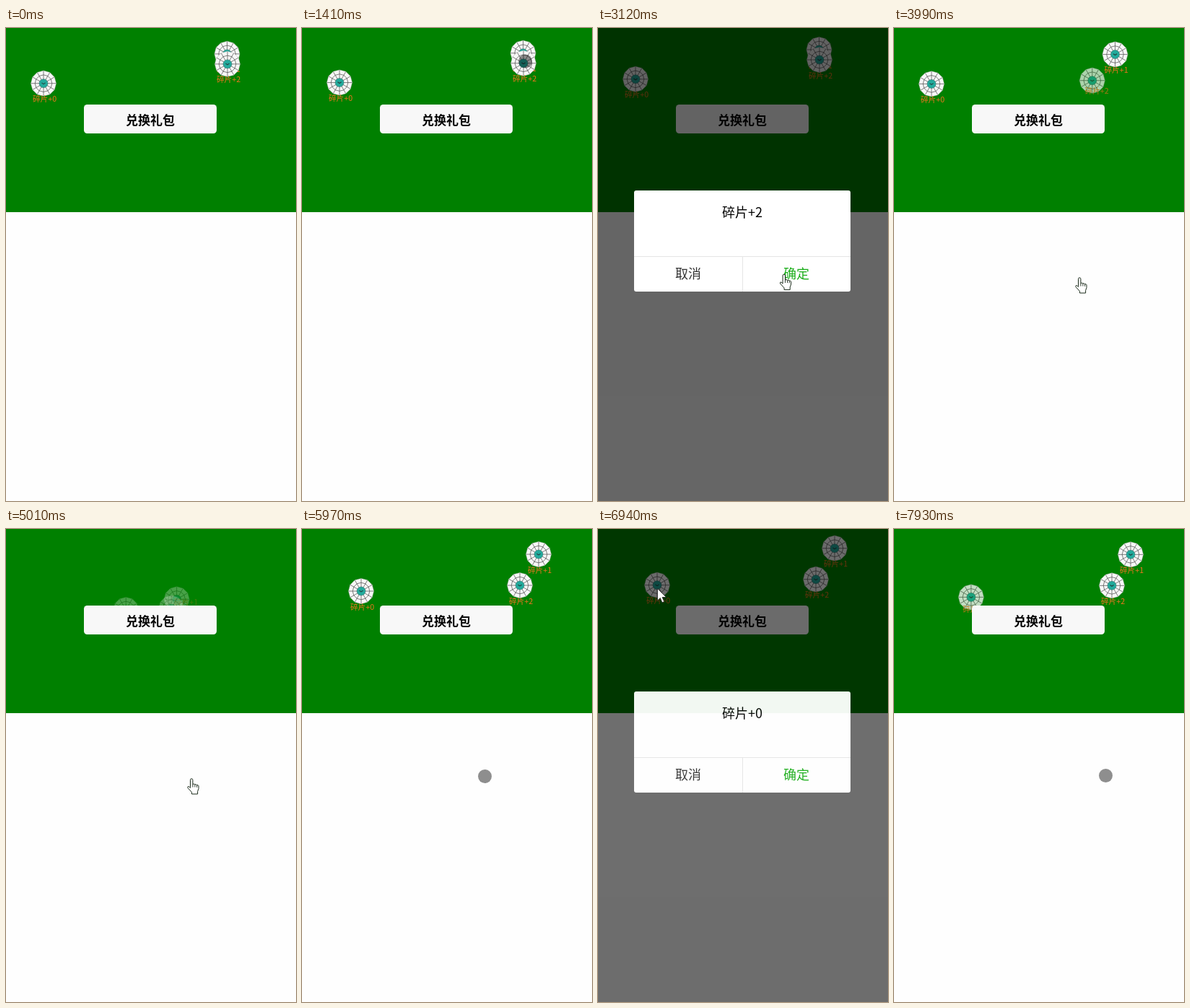
An HTML page for the animation above (8 s loop, 402 by 655 pixels).

```html
<!DOCTYPE html>
<html lang="zh-CN">
<head>
<meta charset="utf-8">
<title>碎片</title>
<style>
  html, body { margin: 0; width: 100%; height: 100%; overflow: hidden; background: #fefefe; }
  svg { display: block; }
  text { font-family: "Noto Sans CJK SC", "Noto Sans CJK", "Noto Sans", sans-serif; text-anchor: middle; }
  .label { font-size: 10.7px; fill: #ee7420; }
  .big { font-size: 18px; }
</style>
</head>
<body>
<svg width="402" height="655" viewBox="0 0 402 655">
  <defs>
    <g id="web"></g>
  </defs>
  <rect width="402" height="655" fill="#fefefe"/>
  <rect width="402" height="255" fill="#008000"/>
  <g id="shards"></g>
  <rect x="108" y="106" width="184" height="40" rx="4.5" fill="#f8f8f8"/>
  <text x="200" y="133.5" font-size="17" font-weight="700">兑换礼包</text>

  <g id="modal">
    <rect width="402" height="655" fill="#000" fill-opacity=".6"/>
    <rect x="50" y="225" width="300" height="140" rx="3" fill="#fff"/>
    <path d="M50 316.5H350M200.5 317V365" stroke="#e5e5e5" fill="none"/>
    <text id="title" class="big" x="200" y="262"></text>
    <text class="big" x="125" y="346.5" fill="#353535">取消</text>
    <text class="big" x="275" y="346.5" fill="#1aad19">确定</text>
  </g>

  <g id="dot"><circle r="9.5" fill="#000" fill-opacity=".44"/></g>
  <g id="arrow">
    <path d="M0 0V16.5L3.8 13L6.4 19.3L9.2 18.1L6.6 12H12Z" fill="#fff" stroke="#222" stroke-width=".8"/>
  </g>
  <g id="hand">
    <g transform="translate(-6 0)" stroke="#1a2a1a" stroke-linejoin="round">
      <path d="M4.5 12V2a1.7 1.7 0 0 1 3.4 0V8q1.7-1.2 3 .4q1.6-.8 2.7.7q2-.4 2.4 1.2V14L14.6 18V21.5H6.5V19L1 13Q.5 10.5 2.5 11L4.5 13Z" fill="#fff"/>
      <path d="M7.9 8v4M10.9 8.6v3.4M13.6 9.3v3" fill="none" stroke-width=".9"/>
    </g>
  </g>
</svg>
<script>
const LOOP = 8000, FLIGHT = 1000;
const HOME = [200, 122];               // behind the button
const $ = id => document.getElementById(id);
const clamp = v => Math.max(0, Math.min(1, v));
const mix = (a, b, p) => a + (b - a) * p;
const smooth = p => p * p * (3 - 2 * p);

// CSS "ease": cubic-bezier(.25, .1, .25, 1)
function ease(x) {
  if (x <= 0 || x >= 1) return clamp(x);
  const curve = (a, b, s) => 3 * a * s * (1 - s) ** 2 + 3 * b * s * s * (1 - s) + s ** 3;
  let lo = 0, hi = 1;
  for (let i = 0; i < 24; i++) {
    const mid = (lo + hi) / 2;
    if (curve(.25, .25, mid) < x) lo = mid; else hi = mid;
  }
  return curve(.1, 1, lo);
}

function buildWeb() {
  const at = (i, r) => {
    const a = i * Math.PI / 6;
    return (r * Math.sin(a)).toFixed(2) + ' ' + (-r * Math.cos(a)).toFixed(2);
  };
  const ids = [...Array(12).keys()];
  const ring = r => 'M' + ids.map(i => at(i, r)).join('L') + 'Z';
  const spokes = ids.map(i => 'M' + at(i, 5) + 'L' + at(i, 17.3)).join('');
  $('web').innerHTML =
    `<path d="${ring(17.6)}" fill="#f7f7f7" stroke="#aaa" stroke-width=".4"/>
     <path d="${spokes}${ring(11.8)}" fill="none" stroke="#555" stroke-width=".75"/>
     <circle r="6" fill="#22aa9c" stroke="#3c6f6a" stroke-width=".6"/>
     <path d="M-2.6 -.8L0 .9L2.6 -.8" fill="none" stroke="#25423f" stroke-width="1.1"/>`;
}

// Resting places (lowest point of the bob) of each set of shards.
const sets = [
  { from: 0, to: 4680, low: -265, period: 2030, taken: 2, takeAt: 3690,
    at: [[52, 78.3], [306.5, 37.5], [307, 51.5]] },
  { from: 4720, to: LOOP, low: 5770, period: 2000, flyIn: 4725, taken: 0, takeAt: 7720,
    at: [[82, 87], [328, 36], [302, 79]] }
];

const dialogs = [
  { open: 1988, close: 3395, title: '碎片+2' },
  { open: 6725, close: 7415, title: '碎片+0' }
];

// time, pointer kind, x, y
const track = [
  [0, '', 320, 606],
  [380, 'dot', 320, 606],
  [800, 'dot', 309.5, 48],
  [1000, 'dot', 309.5, 46],
  [1500, 'dot', 309.5, 46],
  [1850, 'dot', 306, 53],
  [1990, 'arrow', 306, 53],
  [2450, 'arrow', 306, 53],
  [2980, 'hand', 259, 330],
  [3200, 'hand', 257, 345.5],
  [5965, 'dot', 253.5, 342.5],
  [6010, 'dot', 253.5, 342.5],
  [6600, 'dot', 82.5, 82.5],
  [6728, 'arrow', 82.5, 82.5],
  [7000, 'arrow', 82.5, 82.5],
  [7300, 'hand', 293.5, 341.5],
  [7860, 'dot', 293.5, 341.5],
  [LOOP, 'dot', 293.5, 341.5]
];

const shards = [0, 1, 2].map(i => {
  const g = document.createElementNS('http://www.w3.org/2000/svg', 'g');
  g.innerHTML = `<use href="#web"/><text class="label">碎片+${i}</text>`;
  $('shards').append(g);
  return { g, label: g.lastChild };
});

function drawShards(t) {
  const set = sets.find(s => t >= s.from && t < s.to);
  shards.forEach(({ g, label }, i) => {
    g.style.display = set ? '' : 'none';
    if (!set) return;
    let [x, y] = set.at[i];
    let away = 0;                      // 0 at rest, 1 behind the button
    if (set.flyIn && t < set.flyIn + FLIGHT) away = 1 - clamp((t - set.flyIn) / FLIGHT);
    else if (i === set.taken && t >= set.takeAt) away = clamp((t - set.takeAt) / FLIGHT);
    else if (t >= set.low) y -= 5 * (1 - Math.cos((t - set.low) / set.period * 2 * Math.PI));
    x = mix(x, HOME[0], away);
    y = mix(y, HOME[1], away);
    g.setAttribute('transform', `translate(${x} ${y})`);
    g.setAttribute('opacity', 1 - away);
    label.setAttribute('x', 1.5 + 16 * away);
    label.setAttribute('y', 25.5 - 25 * away);
  });
}

function drawModal(t) {
  let shown = 0;
  for (const d of dialogs) {
    if (t < d.open) continue;
    shown = ease((t - d.open) / 300) - ease((t - d.close) / 300);
    $('title').textContent = d.title;
  }
  $('modal').style.display = shown > 0 ? '' : 'none';
  $('modal').setAttribute('opacity', clamp(shown));
}

function drawPointer(t) {
  let i = 0;
  while (i < track.length - 2 && t >= track[i + 1][0]) i++;
  const [t0, kind, x0, y0] = track[i], [t1, next, x1, y1] = track[i + 1];
  const travels = kind === next || next === 'hand';
  const p = travels ? smooth(clamp((t - t0) / (t1 - t0))) : 0;
  for (const id of ['dot', 'arrow', 'hand']) {
    $(id).style.display = id === kind ? '' : 'none';
    $(id).setAttribute('transform', `translate(${mix(x0, x1, p)} ${mix(y0, y1, p)})`);
  }
}

function draw(t) {
  drawShards(t);
  drawModal(t);
  drawPointer(t);
}

buildWeb();
draw(0);
const start = performance.now();
requestAnimationFrame(function tick() {
  draw((performance.now() - start) % LOOP);
  requestAnimationFrame(tick);
});
</script>
</body>
</html>
```
